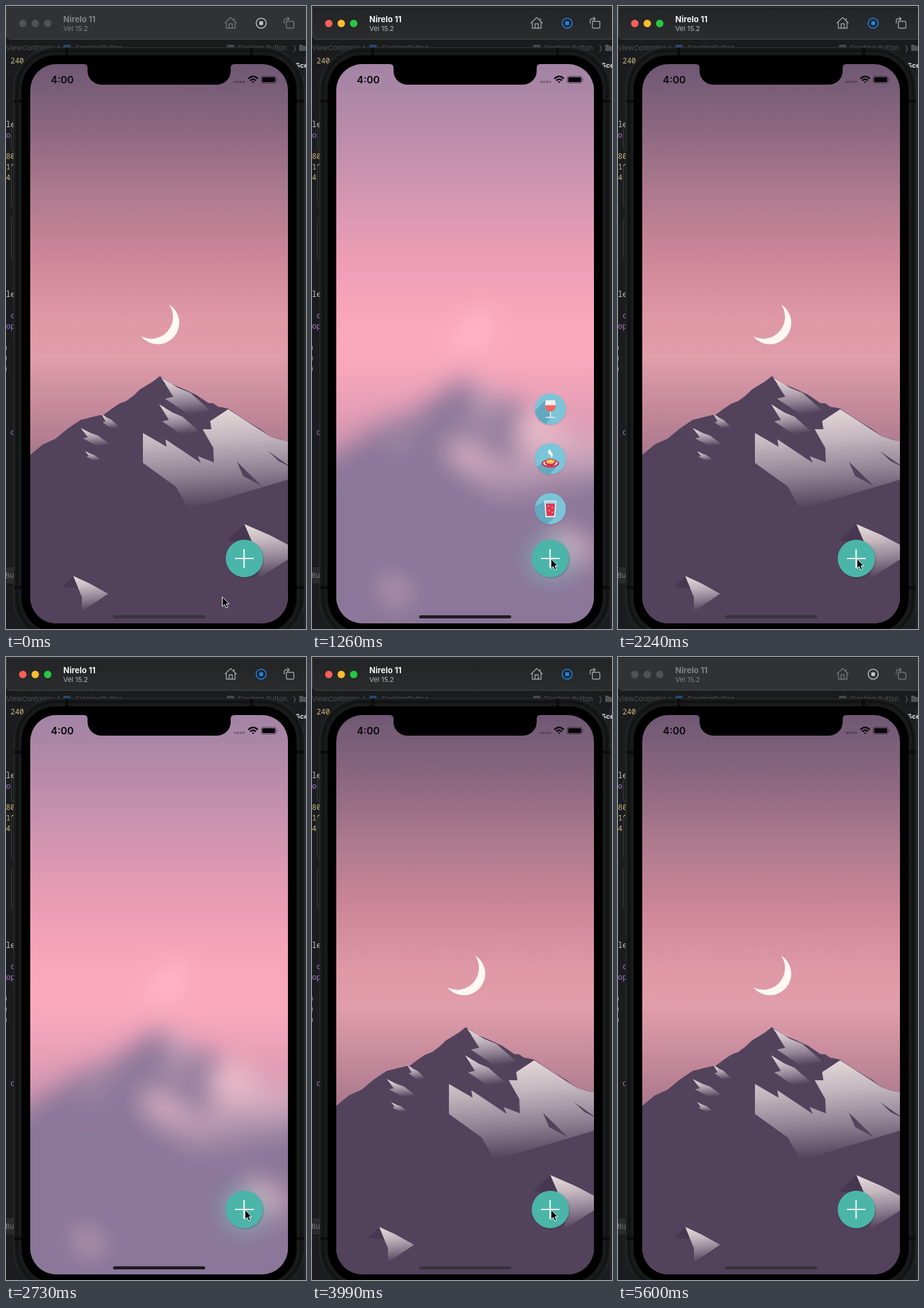
These frames come from a looping animation (482 by 998 pixels, 5670 ms). An HTML page:

```html
<!DOCTYPE html>
<html lang="en">
<head>
<meta charset="utf-8">
<title>Floating button</title>
<style>
  html, body { margin: 0; width: 100%; height: 100%; overflow: hidden; background: #18191b; }
  svg { display: block; width: 482px; height: 998px; }
  text { font-family: Inter, "Noto Sans", sans-serif; }
  #code text { font: 12px "Noto Sans Mono", "DejaVu Sans Mono", monospace; white-space: pre; }
</style>
</head>
<body>
<svg viewBox="0 0 482 998" xmlns="http://www.w3.org/2000/svg">
  <defs>
    <linearGradient id="sky" gradientUnits="userSpaceOnUse" x1="0" y1="93" x2="0" y2="720">
      <stop offset="0" stop-color="#6f5874"/>
      <stop offset=".17" stop-color="#8d6880"/>
      <stop offset=".33" stop-color="#ae7a8e"/>
      <stop offset=".49" stop-color="#cc8699"/>
      <stop offset=".65" stop-color="#df98a6"/>
      <stop offset=".75" stop-color="#e09daa"/>
      <stop offset="1" stop-color="#aa788c"/>
    </linearGradient>
    <linearGradient id="snow" x1="0" y1="0" x2=".12" y2="1">
      <stop offset="0" stop-color="#eadedd"/><stop offset=".35" stop-color="#c4b6be"/>
      <stop offset=".7" stop-color="#8d7f90"/><stop offset="1" stop-color="#54445e"/>
    </linearGradient>
    <linearGradient id="bar" x2="0" y2="1">
      <stop stop-color="#222426"/><stop offset="1" stop-color="#2a2c2e"/>
    </linearGradient>
    <filter id="frost" filterUnits="userSpaceOnUse" x="-60" y="20" width="620" height="1060" color-interpolation-filters="sRGB">
      <feGaussianBlur stdDeviation="20"/>
      <feColorMatrix values=".79 0 0 0 .29  0 .56 0 0 .32  0 0 .46 0 .435  0 0 0 1 0"/>
    </filter>
    <filter id="soft" x="-30%" y="-30%" width="160%" height="160%"><feGaussianBlur stdDeviation="1.2"/></filter>
    <clipPath id="screen"><rect x="39" y="93" width="414" height="896" rx="42"/></clipPath>
    <clipPath id="disc"><circle r="25"/></clipPath>
    <g id="scene">
      <rect x="-60" y="20" width="620" height="1060" fill="url(#sky)"/>
      <path d="M262 478A34.500 34.500 0 1 1 217 529A35 35 0 0 0 262 478Z" fill="#fff8f3"/>
      <g id="mountain"></g>
    </g>
  </defs>

  <rect width="482" height="998" fill="#1b1c1f"/>
  <rect y="54" width="482" height="26" fill="#1a1b1d"/>
  <g fill="#515255" font-size="11">
    <text x="0" y="71">ViewController  ❭</text>
    <rect x="92" y="62" width="12" height="9" rx="2" fill="#214a70"/>
    <text x="112" y="71">FloatingButton</text>
    <rect x="355" y="62" width="12" height="9" rx="2" fill="#47484b"/>
    <text x="373" y="71">Floating Button</text>
    <text x="459" y="71">❭</text>
    <path d="M471 62h5l2 2h6v8h-13z"/>
  </g>
  <g id="code"></g>
  <path d="M0 898H30V926H0Z" fill="#2a2b2e" stroke="#111"/>
  <text x="-1" y="916" font-size="11" fill="#77787b">Bu</text>
  <rect x="478" y="82" width="4" height="916" fill="#242529"/>
  <text x="465" y="99" font-size="11" font-weight="700" fill="#e3e3e4">Sce</text>

  <g fill="#1d1e1f" stroke="#3a3b3c">
    <rect x="8.500" y="195.500" width="6" height="35" rx="2"/>
    <rect x="8.500" y="255.500" width="6" height="66" rx="2"/>
    <rect x="8.500" y="339.500" width="6" height="64" rx="2"/>
  </g>
  <rect x="12.500" y="66.500" width="467" height="950" rx="66" fill="#191a1a" stroke="#303132"/>
  <rect x="18" y="72" width="456" height="938" rx="61" fill="none" stroke="#111213" stroke-width="3"/>
  <path d="M97.500 67v12M394.500 67v12M13 152.500h12M467 152.500h12M13 931.500h12M467 931.500h12" stroke="#0c0c0c" stroke-width="5"/>
  <rect x="25" y="79" width="442" height="924" rx="55"/>

  <g clip-path="url(#screen)">
    <use href="#scene"/>
    <g id="blurred" filter="url(#frost)">
      <use href="#scene"/>
      <circle cx="383" cy="885" r="30" fill="#4bb5aa"/>
    </g>
    <g id="items"></g>
    <circle cx="384" cy="886" r="30" opacity=".25" filter="url(#soft)"/>
    <circle cx="383" cy="885" r="30" fill="#4bb5aa"/>
    <path d="M368 885H398M382.500 870V900" stroke="#fff" stroke-width="2"/>
    <rect id="homeBar" x="172" y="976" width="148" height="5" rx="2.500"/>
    <text x="72" y="123.500" font-size="16" font-weight="600" fill="#08060a">4:00</text>
    <path d="M368 121.500H383" stroke="#000" stroke-opacity=".28" stroke-width="4" stroke-linecap="round" stroke-dasharray="0 4.700"/>
    <g fill="none" stroke="#08060a" stroke-width="2.500">
      <path d="M389.500 116.500Q397 109 404.500 116.500M392.500 119.500Q397 115 401.500 119.500"/>
      <path d="M395 121.500L397 123.500L399 121.500Q397 120 395 121.500Z" fill="#08060a" stroke="none"/>
      <rect x="410" y="112.500" width="24" height="11" rx="3" stroke-width="1" opacity=".5"/>
    </g>
    <rect x="411.500" y="114" width="21" height="8" rx="1.700" fill="#08060a"/>
    <path d="M435.500 116.500q2 1.500 0 3.500z" fill="#08060a" opacity=".6"/>
  </g>
  <path d="M125 92V93Q131 93 131 99V104A22 22 0 0 0 153 126H339A22 22 0 0 0 361 104V99Q361 93 367 93V92Z"/>

  <rect width="482" height="3" fill="#0b0b0c"/>
  <path id="toolbar" d="M-.5 1.500H482.500V53.500H9Q.5 53.500 .5 45V1.500Z" stroke="#434548"/>
  <g id="lights"></g>
  <text id="title" x="92" y="26" font-size="13" font-weight="700">Nirelo 11</text>
  <text id="version" x="92" y="40" font-size="11">Vel 15.2</text>
  <g id="tools" fill="none" stroke-width="1.400">
    <path d="M351.500 27.500L361 18.500L370.500 27.500M354 26V35.500H368V26M358.500 35V28.500H363.500V35M366.500 23V19.500"/>
    <path d="M450.500 24.500H460.500Q462.500 24.500 462.500 26.500V33.500Q462.500 35.500 460.500 35.500H452.500Q450.500 35.500 450.500 33.500ZM447 28V23.500Q447 20.500 450 20.500H455M452 17.500L455 20.500L452 23.500"/>
  </g>
  <g id="stop">
    <circle cx="410" cy="27.500" r="8" fill="none" stroke="currentColor" stroke-width="1.500"/>
    <rect x="407" y="24.500" width="6" height="6" rx="1" fill="currentColor"/>
  </g>
  <path id="cursor" d="M0 0V15.500L3.600 12.300L6 17.800L8.700 16.600L6.300 11.300H11Z" stroke="#fff"/>
</svg>
<script>
const LOOP = 5670;
const ITEM_GAP = 80;
const BUTTON = { x: 383, y: 885 };
const ROCK = '#52425c', SHADE = '#463850', SNOW = 'url(#snow)';
const $ = id => document.getElementById(id);
const clamp = v => Math.min(1, Math.max(0, v));
const mix = (a, b, p) => a + (b - a) * p;

function seeded(seed) {
  return () => (seed = seed * 16807 % 2147483647) / 2147483647;
}

const pairs = text => text.split(', ').map(pair => pair.split(' ').map(Number));
const polygon = (points, fill) => `<polygon points="${points.join(' ')}" fill="${fill}"/>`;

// Splits each edge in four, nudging the new points up or down
function craggy(points, roughness) {
  const random = seeded(11);
  return points.flatMap(([x, y], i) => {
    const [nx, ny] = points[i + 1] || [x, y];
    return [0, .25, .5, .75].map(p =>
      [mix(x, nx, p), mix(y, ny, p) + (p && (random() - .5) * roughness)]);
  });
}

// One unit outline placed at a corner and sized
const placed = (outline, x, y, w, h) => pairs(outline).map(([u, v]) => [x + u * w, y + v * h]);
const FLAKE = '0 0, .35 .27, .6 .4, 1 .85, .6 1, .4 .82, .08 .55, .25 .5';
const SPUR = '0 0, .45 .2, 1 .5, .25 1, .25 .6';
const SPUR_SHADE = '0 0, -.3 .3, .2 .35';
const flake = (...box) => polygon(placed(FLAKE, ...box), SNOW);
const spur = (...box) => polygon(placed(SPUR_SHADE, ...box), SHADE) + polygon(placed(SPUR, ...box), SNOW);

const ridge = pairs('-20 757, 39 719, 120 663, 158 654, 205 624, 247 593, 325 636, 357 645, 425 690, 500 715');
const snowfield = pairs('220 684, 258 706, 256 694, 313 732, 308 721, 334 731, 333 708, 316 678, 330 678, 328 665, 357 646, 425 690, 500 712, 500 745, 293 806, 273 770, 220 732');
const clefts = ['247 593, 256 605, 248 607', '371 730, 411 769, 381 753', '421 713, 460 740, 438 729'];

$('mountain').innerHTML =
  polygon([...craggy(ridge, 6), [560, 1080], [-60, 1080]], ROCK) +
  polygon(snowfield, SNOW) +
  flake(249, 595, 79, 62) + flake(246, 638, 63, 50) +
  flake(120, 676, 46, 30) + flake(153, 653, 28, 25) + flake(127, 713, 25, 16) +
  spur(383, 830, 90, 87) + spur(108, 913, 56, 57) +
  clefts.map(cleft => polygon(pairs(cleft), ROCK)).join('');

// Editor text peeking out on the left, keyed by line number
const codeLines = {
  '-6': ' 240', 0: 'le:', 1: 'op', 3: '80', 4: '160', 5: '4', 16: 'le:',
  18: ' c', 19: 'op', 21: ')', 22: ')', 23: ')', 29: ' o'
};
const codeColor = label => /\d/.test(label) ? '#c9b978' : /[:)]/.test(label) ? '#c8c8ca' : '#a678cf';
$('code').innerHTML = Object.entries(codeLines).map(([line, label]) =>
  `<text x="${label === ')' ? -4 : 0}" y="${194 + 17 * line}" fill="${codeColor(label)}">${label}</text>`).join('');

$('lights').innerHTML = [0, 1, 2].map(i => `<circle cx="${27 + 20 * i}" cy="28" r="6"/>`).join('');

const icons = [
  // wine
  `<path d="M-8-14L-30 8L-10 30L0 13V4Z" fill="#62a9bf"/>
   <path d="M-7.500-14H7.500L8.500-5H-8.500Z" fill="#f4efec"/>
   <path d="M-8.500-6H8.500Q8.500 4 0 4.500Q-8.500 4-8.500-6Z" fill="#ef6660"/>
   <path d="M0 4V13M-7.500 13.500H7.500" stroke="#f4efec" stroke-width="1.600"/>`,
  // soup
  `<path d="M-13 6L-30 20L-10 35L13 9Z" fill="#62a9bf"/>
   <ellipse cy="7.500" rx="14" ry="6.500" fill="#cf2f55"/>
   <ellipse cy="7" rx="11.500" ry="4.700" fill="#f3dfe0"/>
   <path d="M-9 5H9Q8 12 0 12.500Q-8 12-9 5Z" fill="#d5304f"/>
   <ellipse cy="4.500" rx="9" ry="4.500" fill="#d5304f"/>
   <ellipse cy="4.500" rx="7" ry="3.300" fill="#f6c65b"/>
   <path d="M-1-16Q-7-9 0-6Q2-4 1-1Q6-6 2-10Q-1-13-1-16Z" fill="#fff"/>`,
  // drink
  `<path d="M-9-12L-30 0L-12 32L7 13Z" fill="#62a9bf"/>
   <path d="M-9-12H9L7 13H-7Z" fill="#9bd3e0" stroke="#f1f3f4" stroke-width="1.500"/>
   <path d="M-7.300-8H7.300L5.800 11.500H-5.800Z" fill="#e4344f"/>
   <path d="M-3-4h0M3-2h0M-2 3h0M3 6h0" stroke="#fbe6e8" stroke-width="2" stroke-linecap="round"/>`
];
$('items').innerHTML = icons.map(icon => `<g>
  <circle cy="1" r="25" opacity=".16" filter="url(#soft)"/>
  <circle r="25" fill="#7cc4d8"/><g clip-path="url(#disc)">${icon}</g></g>`).join('');

const progress = (t, from, to) => clamp((t - from) / (to - from));
const easeInOut = p => p * p * (3 - 2 * p);
const easeOut = p => 1 - (1 - p) ** 2;
const show = (el, on) => el.setAttribute('display', on ? 'inline' : 'none');

function spring(ms) {
  const t = Math.max(0, ms) / 1000, omega = 11, damping = .6;
  const wd = omega * Math.sqrt(1 - damping ** 2);
  return 1 - Math.exp(-damping * omega * t) * (Math.cos(wd * t) + damping * omega / wd * Math.sin(wd * t));
}

const CLOSING = 160, CLEAR_DELAY = 315;
const taps = [
  { open: 640, blur: 690, close: 1850 },
  { open: 2724, blur: 2725, close: 3670 }
];

function spreadAt(t) {
  const tap = taps.find(({ open, close }) => t >= open && t < close + CLOSING);
  return tap ? spring(t - tap.open) * (1 - progress(t, tap.close, tap.close + CLOSING)) : 0;
}

function setCursor(t) {
  const arrive = easeOut(progress(t, 40, 520));
  const leave = easeInOut(progress(t, 4345, 4830));
  const x = mix(mix(347.5, 384, arrive), 226, leave);
  const y = mix(mix(946.5, 885.5, arrive), 1000, leave);
  $('cursor').setAttribute('transform', `translate(${x} ${y})`);
}

function setWindow(active) {
  const paint = (id, fill) => $(id).setAttribute('fill', fill);
  paint('toolbar', active ? 'url(#bar)' : '#303235');
  paint('title', active ? '#f2f2f3' : '#828287');
  paint('version', active ? '#b5b6b8' : '#818286');
  $('tools').setAttribute('stroke', active ? '#a3a4a6' : '#75767a');
  $('stop').setAttribute('color', active ? '#1c86ee' : '#c4c5c8');
  const colors = ['#fc5f57', '#fdbd2e', '#28c940'];
  [...$('lights').children].forEach((dot, i) => dot.setAttribute('fill', active ? colors[i] : '#515256'));
}

function render(t) {
  const blurred = taps.some(({ blur, close }) => t >= blur && t < close + CLEAR_DELAY);
  const spread = spreadAt(t);
  show($('blurred'), blurred);
  show($('items'), spread > .005);
  $('homeBar').setAttribute('fill', blurred ? '#1f1c22' : '#38333c');
  [...$('items').children].forEach((item, i) =>
    item.setAttribute('transform', `translate(${BUTTON.x} ${BUTTON.y - ITEM_GAP * (3 - i) * spread})`));
  setCursor(t);
  setWindow(t >= 555 && t < 5525);
}

const start = performance.now();
function tick() {
  render((performance.now() - start) % LOOP);
  requestAnimationFrame(tick);
}
tick();
</script>
</body>
</html>
```
